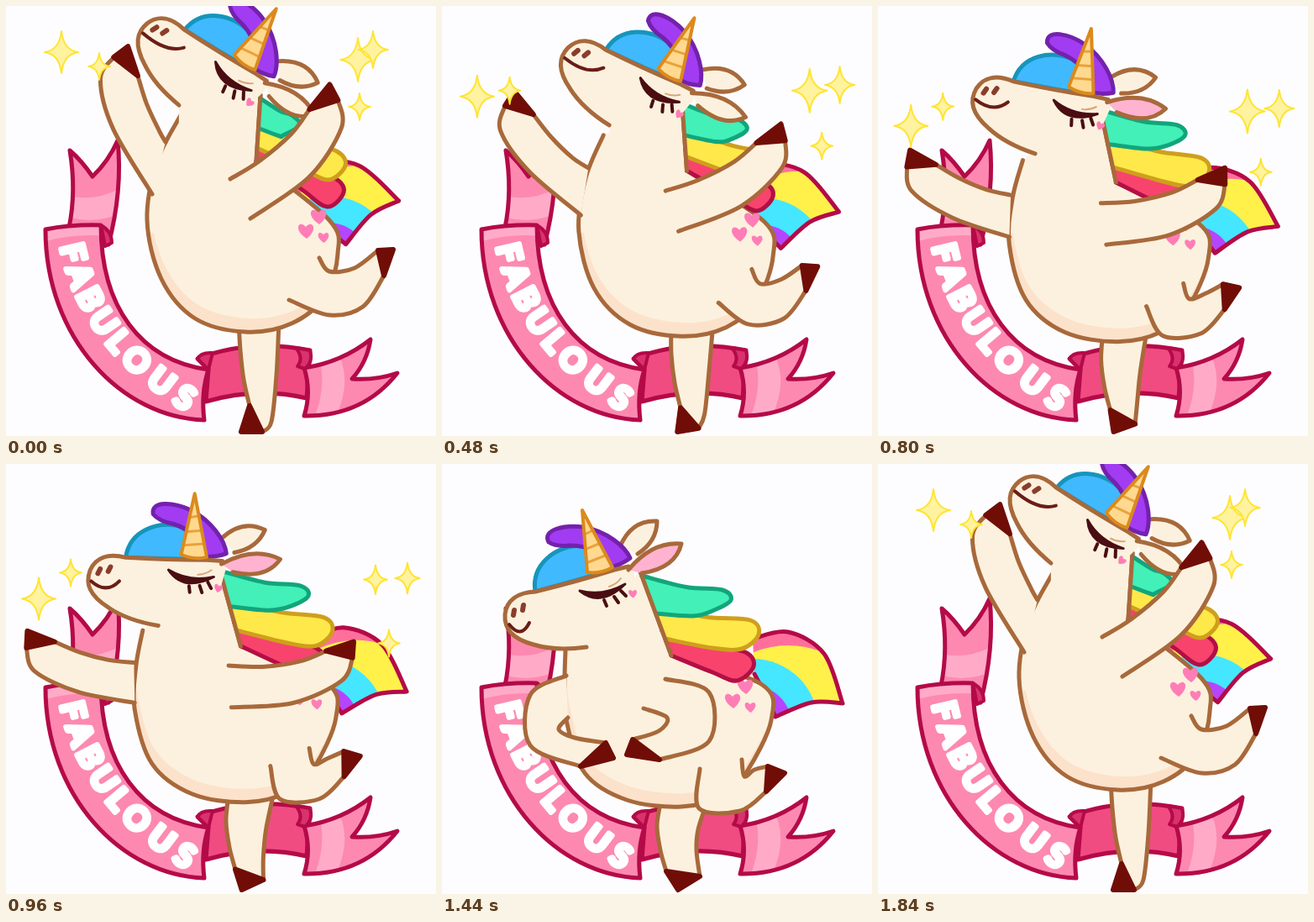
These frames come from a looping animation (512x512 px, 1920 ms). An HTML page with a canvas:

```html
<!DOCTYPE html>
<html lang="en">
<head>
<meta charset="utf-8">
<title>Fabulous unicorn</title>
<style>
html, body { margin: 0; height: 100%; overflow: hidden; background: #fdfdff; }
canvas { display: block; width: 100vw; height: 100vh; }
</style>
</head>
<body>
<canvas id="stage" width="512" height="512"></canvas>
<script>
const c = document.getElementById('stage').getContext('2d');
const LOOP = 1920, STEP = 80, DOWN = 1440, UP = 280;
const CREAM = '#fcf1de', SHADE = '#fce2cb', BROWN = '#a8693b', HOOF = '#710d07', EYE = '#4a0d12';
const PINK = '#fd89b0', LIGHT = '#ffabc8', HOT = '#f04c82', FOLD = '#d9326c', CRIMSON = '#b40a48';

const clamp = v => Math.max(0, Math.min(1, v));
const smooth = v => { v = clamp(v); return v * v * (3 - 2 * v); };
const lerp = (a, b, k) => a + (b - a) * k;
const between = (p, q, k) => [lerp(p[0], q[0], k), lerp(p[1], q[1], k)];
const blend = ([from, to], k) => from.map((p, i) => between(p, to[i], k));

// "!" marks a corner, stored as a doubled point.
const pts = text => text.trim().split(/\s+/).flatMap(word => {
  const p = word.replace('!', '').split(',').map(Number);
  return word.endsWith('!') ? [p, p] : [p];
});

// Each shape has a stretched-up pose and a crouched pose.
const body = [
  '303,106 298,185! 385,255 395,295 380,345 340,378 285,388 225,372 185,325 168,255 180,185 208,130!',
  '236,128 273,228! 380,262 392,305 362,368 335,395 285,408 220,400 170,368 148,305 146,260 147,222!'
].map(pts);
const backLeg = [
  '373,300 385,316 415,312 443,291! 461,290! 450,321! 425,358 385,368 337,350',
  '357,352 360,372 372,364 388,360! 408,368! 386,390! 355,413 306,410 307,363'
].map(pts);
const leg = [
  '277,375 279,410 283,445 290,476! 280,507! 305,507! 316,495 322,440 325,375',
  '261,400 256,430 260,460 267,485! 281,507! 307,491! 303,460 305,435 315,405'
].map(pts);
// Arms swing rigidly between raised and wide, then fold.
const leftArm = {
  shapes: ['150,241 118,239 85,232 54,221! 21,210! 21,230! 32,257 85,279 152,288',
    '148,252 105,275 105,335 165,360! 204,350! 195,332! 158,326 139,316 150,302'].map(pts),
  raised: pts('190,162 174,224'), turn: 53, stretch: .06
};
const rightArm = {
  shapes: ['265,242 305,245 350,240 381,229! 414,219! 412,238! 398,265 340,289 267,292',
    '266,256 318,272 318,330 259,352! 220,346! 227,328! 258,318 268,302 240,291'].map(pts),
  raised: pts('267,206 291,253'), turn: -34, stretch: .11
};
// Fill, edge, neck span, tip when up, tip when crouched, half width, sway.
const locks = [
  ['#f8436d', '#b20f45', .7, 1, [402, 222], [371, 241], 17, 0],
  ['#ffe84a', '#cf9f1c', .4, .8, [404, 190], [377, 203], 17, 6],
  ['#42f0b8', '#12a57c', .05, .5, [350, 142], [344, 162], 12, 20]
];
const sparkles = [
  { x: 66, y: 55, dx: -27, dy: 123, r: 25, end: 1420 },
  { x: 111, y: 72, dx: -34, dy: 67, r: 16, end: 1420 },
  { x: 419, y: 64, dx: 21, dy: 86, r: 26, end: 1120 },
  { x: 437, y: 52, dx: 41, dy: 98, r: 22, end: 1160 },
  { x: 421, y: 120, dx: 35, dy: 109, r: 16, end: 1420 }
];

function spline(p) {
  const path = new Path2D();
  path.moveTo(...p[0]);
  for (let i = 0; i < p.length - 1; i++) {
    const a = p[i - 1] || p[i], b = p[i], d = p[i + 1], e = p[i + 2] || d;
    if (b[0] === d[0] && b[1] === d[1]) continue;
    path.bezierCurveTo(b[0] + (d[0] - a[0]) / 6, b[1] + (d[1] - a[1]) / 6,
      d[0] - (e[0] - b[0]) / 6, d[1] - (e[1] - b[1]) / 6, ...d);
  }
  return path;
}

function paint(path, fill, stroke, width = 5) {
  if (typeof path === 'string') path = new Path2D(path);
  if (fill) { c.fillStyle = fill; c.fill(path); }
  if (stroke) { c.strokeStyle = stroke; c.lineWidth = width; c.stroke(path); }
}

function layer(draw, clip) {
  c.save();
  if (clip) c.clip(typeof clip === 'string' ? new Path2D(clip) : clip);
  draw();
  c.restore();
}

function disc(x, y, r, fill) {
  c.fillStyle = fill;
  c.beginPath();
  c.arc(x, y, r, 0, 7);
  c.fill();
}

function spin(x, y, degrees) {
  c.translate(x, y);
  c.rotate(degrees * Math.PI / 180);
  c.translate(-x, -y);
}

function limb(p) {
  paint(spline(p), CREAM, BROWN);
  const hoof = new Path2D();
  [p[3], p[5], p[7]].forEach(q => hoof.lineTo(...q));
  hoof.closePath();
  paint(hoof, HOOF, HOOF, 6);
}

function arm({ shapes, raised, turn, stretch }, m) {
  const shape = blend(shapes, m.fold), last = shape.length - 1;
  const ends = blend([raised, [shape[0], shape[last]]], m.swing);
  const from = between(shape[0], shape[last], .5), to = between(...ends, .5);
  const lift = 1 - m.swing, angle = turn * lift * Math.PI / 180, size = 1 + stretch * lift;
  const cos = Math.cos(angle) * size, sin = Math.sin(angle) * size;
  limb(shape.map(([x, y], i) => {
    if (i === 0) return ends[0];
    if (i === last) return ends[1];
    x -= from[0];
    y -= from[1];
    return [to[0] + x * cos - y * sin, to[1] + x * sin + y * cos];
  }));
}

function heart(x, y, size) {
  layer(() => {
    c.translate(x, y);
    c.scale(size, size);
    paint('M.1,1 C-1.6,-.1 -.8,-1.3 0,-.4 C.7,-1.3 1.6,-.2 .1,1', '#ff7db6');
  });
}

function ribbon() {
  const strip = (shape, shine) => {
    paint(shape, PINK);
    layer(() => paint(shine, LIGHT), shape);
    paint(shape, null, CRIMSON);
  };
  strip('M76,172 Q90,184 103,203 Q122,185 133,160 Q139,220 122,284 L75,264 Q84,220 76,172Z',
    'M70,225 Q105,235 140,215 V245 Q105,262 70,250Z');
  paint('M113,261 L118,286 L126,282 Q126,268 113,261Z', FOLD, CRIMSON, 4);
  paint('M228,420 Q290,396 362,410 L358,467 Q300,453 238,471 L241,433Z', HOT, CRIMSON);
  paint('M228,420 Q232,412 246,413 L241,433Z', FOLD, CRIMSON, 4);
  strip('M355,431 Q400,424 434,397 Q430,424 412,444 Q440,446 466,437 Q425,489 355,488 Q364,460 355,431Z',
    'M393,410 Q415,445 390,495 H365 Q385,450 370,410Z');
  paint('M362,410 Q366,424 356,432 L347,429 Q355,419 345,407Z', FOLD, CRIMSON, 4);
  strip('M47,266 Q78,260 113,261 C113,358 160,422 241,433 Q232,460 236,493 C138,490 47,396 47,266Z',
    'M40,255 H120 V274 Q80,270 40,282Z');
  lettering('FABULOUS');
}

function lettering(word) {
  c.font = '700 38px Lato, Inter, sans-serif';
  c.textAlign = 'center';
  c.textBaseline = 'alphabetic';
  c.fillStyle = c.strokeStyle = '#fff';
  c.lineWidth = 6;
  const total = c.measureText(word).width;
  let run = 0;
  for (const letter of word) {
    const w = c.measureText(letter).width, t = (run + w / 2) / total, s = 1 - t;
    run += w;
    layer(() => {
      c.translate(78 * s * s + 200 * s * t + 222 * t * t, 281 * s * s + 796 * s * t + 471 * t * t);
      c.rotate(Math.atan2(117 * s + 73 * t, 22 * s + 122 * t));
      c.fillText(letter, 0, 14);
      c.strokeText(letter, 0, 14);
    });
  }
}

function drawTail(m) {
  const shape = spline(pts('370,208 412,200 455,226 477,285! 440,284 397,301! 385,275 372,250'));
  layer(() => {
    spin(366, 277, -28 * (1 - m.drop));
    paint(shape, '#ff6f9c');
    layer(() => {
      disc(412, 322, 106, '#fff04a');
      disc(370, 310, 78, '#45e6ff');
      disc(370, 310, 46, '#b545ff');
    }, shape);
    paint(shape, null, CRIMSON);
  });
}

function drawMane(neck, m) {
  for (const [fill, edge, start, stop, up, down, w, sway] of locks) {
    const a = between(...neck, start), b = between(...neck, stop);
    const [tx, y] = between(up, down, m.drop), x = tx + sway * Math.sin(Math.PI * m.drop);
    paint(spline([a, [(a[0] + x) / 2, (a[1] + y - w) / 2 + 5], [x - 10, y - w], [x, y],
      [x - 20, y + w], [(b[0] + x) / 2, (b[1] + y + w) / 2 + 5], b]), fill, edge);
  }
}

function drawBody(m) {
  const p = blend(body, m.drop), shape = spline(p), neck = p.slice(0, 2);
  paint(shape, SHADE);
  layer(() => {
    c.fillStyle = CREAM;
    c.fillRect(0, 0, 512, 270);
    c.translate(4, -16);
    paint(shape, CREAM);
  }, shape);
  paint(shape, null, BROWN);
  const [x, y] = between([357, 267], [346, 281], m.drop);
  heart(x + 15, y - 17, 10);
  heart(x, y, 10);
  heart(x + 21, y + 8, 7);
  drawMane(neck, m);
  paint(spline(neck), null, BROWN);
}

function ear(x, y, extra, shape, fill) {
  layer(() => {
    spin(x, y, extra);
    paint(shape, fill, BROWN);
  });
}

function drawHead(m) {
  const turn = 47 * (1 - m.tilt);
  layer(() => {
    c.translate(lerp(265, 191, m.tilt) - 191, lerp(89, 155, m.drop) - 155);
    spin(191, 155, turn);
    ear(222, 106, turn * .34, 'M212,98 Q226,66 256,68 Q256,92 233,107', CREAM);
    paint('M111,152 C106,120 134,97 168,97 Q196,100 206,125 Q160,139 111,152Z', '#41b9ff', '#1695bb');
    paint('M127,93 C119,78 146,72 168,75 C196,80 218,98 224,112 Q212,121 199,123 Q185,97 153,97 Q136,99 127,93Z',
      '#a13cf2', '#7421ad');
    const face = 'M172,218 Q135,223 109,215 C83,208 74,196 75,179 C77,162 90,153 111,152 Q160,140 205,126 L222,122';
    paint(face + ' L229,130 L230,175 L190,235Z', CREAM);
    paint(face, null, BROWN);
    const horn = 'M167,55 L173,129 Q190,131 203,123Z';
    paint(horn, '#ffd98f');
    layer(() => paint('M165,86 L184,77 M167,103 L194,92 M169,119 L202,106', null, '#e9a23d', 3), horn);
    paint(horn, null, '#db8a1d', 4);
    paint('M164,151 Q189,171 218,143 Q192,158 164,151Z', EYE, EYE, 3);
    paint('M193,162 L196,169 M205,158 L210,165 M213,151 L219,157', null, EYE, 4);
    paint('M199,146 Q208,143 213,136', null, '#d9a77c', 2);
    paint('M86,174 L85,180 M97,168 L96,174', null, '#8a3d2b', 6);
    // The smile widens as the head lifts.
    const [sx, sy] = between([126, 167], [104, 189], m.tilt);
    paint(`M80,191 Q${sx - 10},${sy + 20} ${sx},${sy}`, null, '#6b1d17', 4);
    heart(227, 154, 5.5);
    ear(226, 128, turn * .25, 'M222,126 Q250,92 285,95 Q278,124 238,130', m.tilt > .15 ? '#ffb3d1' : CREAM);
  });
}

function drawSparkle({ x, y, dx, dy, r, end }, t) {
  const shown = t > 1600 ? (t - 1600) / 160 : (end - t) / 240;
  if (shown <= 0) return;
  const u = t > 1600 ? 0 : t / 1120;
  const size = r * clamp(shown), w = size * .8, k = size * .1;
  layer(() => {
    c.translate(x + dx * (1 - (1 - Math.min(u, 1)) ** 4), y + dy * u);
    paint(`M0,${-size} Q${k},${-k} ${w},0 Q${k},${k} 0,${size} Q${-k},${k} ${-w},0 Q${-k},${-k} 0,${-size}Z`,
      '#fff3a0', '#ffe433', 2);
  });
}

// A slow sink, then a quick rise back along the same path.
function motion(t) {
  const u = t < DOWN ? t / DOWN : clamp(1 - (t - DOWN) / UP);
  return { drop: smooth(u), tilt: smooth(u ** 1.3), swing: smooth(u / .78), fold: smooth((u - .78) / .22) };
}

function frame() {
  const t = Math.floor(performance.now() % LOOP / STEP) * STEP, m = motion(t);
  c.lineCap = c.lineJoin = 'round';
  c.fillStyle = '#fdfdff';
  c.fillRect(0, 0, 512, 512);
  ribbon();
  drawTail(m);
  limb(blend(leg, m.drop));
  drawBody(m);
  limb(blend(backLeg, m.drop));
  drawHead(m);
  arm(leftArm, m);
  arm(rightArm, m);
  sparkles.forEach(s => drawSparkle(s, t));
  requestAnimationFrame(frame);
}
frame();
</script>
</body>
</html>
```
